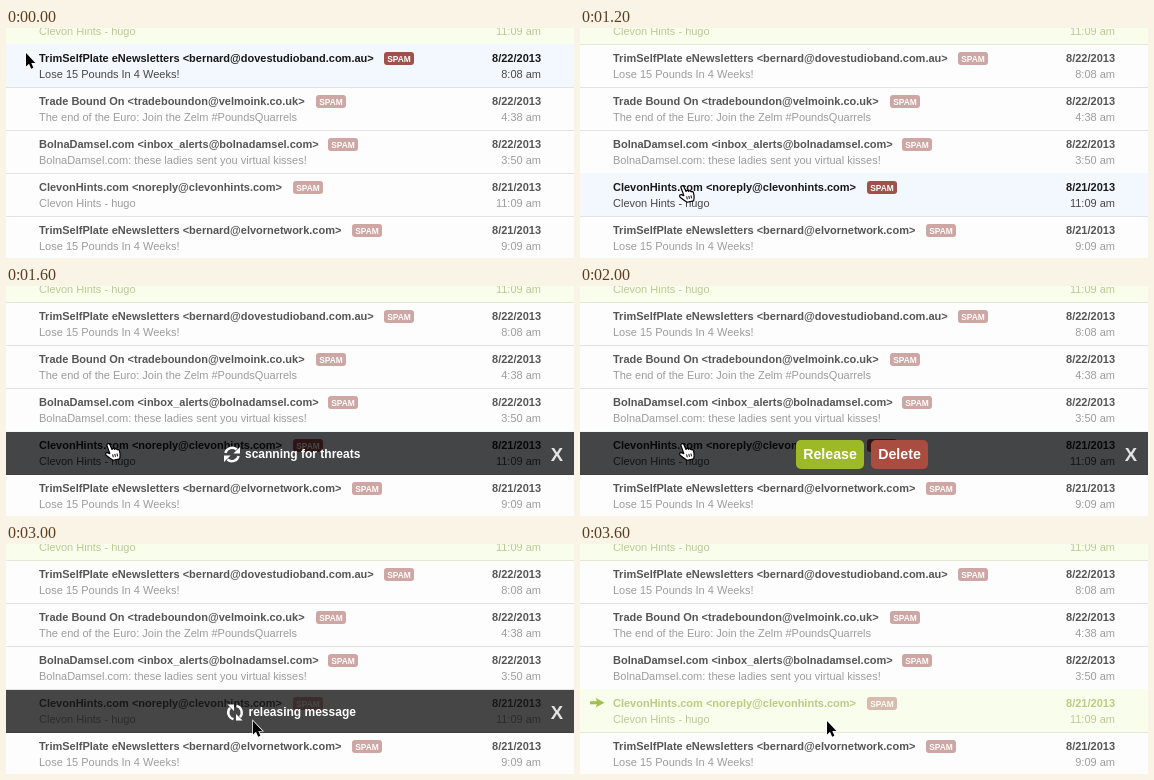
An HTML page for the animation above (8.6 s loop, 568 by 230 pixels).

```html
<!DOCTYPE html>
<html lang="en">
<head>
<meta charset="utf-8">
<title>Quarantined mail</title>
<style>
  html, body { margin: 0; width: 100%; height: 100%; overflow: hidden; background: #fdfdfd; }
  svg { display: block; font: 11px "Liberation Sans", Arial, sans-serif; }
  .bold { font-weight: bold; }
</style>
</head>
<body>
<svg id="stage" width="568" height="230" viewBox="0 0 568 230"></svg>
<script>
const LOOP = 8600, STEP = 200;
const GREEN = { bg: "#f9fdec", title: "#bccb83", sub: "#bdc894", line: "#e4e9d6" };
const stage = document.getElementById("stage");

function el(tag, attrs, parent = stage, text) {
  const node = document.createElementNS("http://www.w3.org/2000/svg", tag);
  set(node, attrs);
  if (text) node.textContent = text;
  return parent.appendChild(node);
}
function set(node, attrs) {
  for (const key in attrs) node.setAttribute(key, attrs[key]);
}
function label(text, x, y, attrs, parent) {
  return el("text", { x, y, ...attrs }, parent, text);
}
const show = (node, on) => set(node, { visibility: on ? "visible" : "hidden" });
const ramp = (t, start, length) => Math.min(1, Math.max(0, (t - start) / length));
const grey = (dim, lit, k) => {
  const v = Math.round(dim + (lit - dim) * k);
  return `rgb(${v},${v},${v})`;
};

// Message list
const RIGHT = { "text-anchor": "end" };
const messages = [
  ["TrimSelfPlate eNewsletters <bernard@dovestudioband.com.au>", "Lose 15 Pounds In 4 Weeks!", 378, "8/22/2013", "8:08 am"],
  ["Trade Bound On <tradeboundon@velmoink.co.uk>", "The end of the Euro: Join the Zelm #PoundsQuarrels", 310, "8/22/2013", "4:38 am"],
  ["BolnaDamsel.com <inbox_alerts@bolnadamsel.com>", "BolnaDamsel.com: these ladies sent you virtual kisses!", 322, "8/22/2013", "3:50 am"],
  ["ClevonHints.com <noreply@clevonhints.com>", "Clevon Hints - hugo", 287, "8/21/2013", "11:09 am"],
  ["TrimSelfPlate eNewsletters <bernard@elvornetwork.com>", "Lose 15 Pounds In 4 Weeks!", 346, "8/21/2013", "9:09 am"]
];

el("rect", { width: 568, height: 16, fill: GREEN.bg });
el("rect", { y: 16, width: 568, height: 1, fill: GREEN.line });
label("Clevon Hints - hugo", 33, 7, { fill: GREEN.sub });
label("11:09 am", 535, 7, { fill: GREEN.sub, ...RIGHT });

const rows = messages.map(([from, subject, badgeX, date, time], i) => {
  const g = el("g", { transform: `translate(0 ${17 + 43 * i})` });
  // The lit background also covers the divider above it
  const bg = el("rect", { y: -1, width: 568, height: 43 }, g);
  const line = el("rect", { y: 42, width: 568, height: 1 }, g);
  const title = el("g", { class: "bold" }, g);
  label(from, 33, 17, {}, title);
  label(date, 535, 17, RIGHT, title);
  const sub = el("g", {}, g);
  label(subject, 33, 33, {}, sub);
  label(time, 535, 33, RIGHT, sub);
  const badge = el("g", {}, g);
  el("rect", { x: badgeX, y: 7, width: 30, height: 13, rx: 3, fill: "#a0514b" }, badge);
  label("SPAM", badgeX + 15, 16.7, { fill: "#fff", class: "bold", "font-size": 8.4, "text-anchor": "middle" }, badge);
  return { bg, line, title, sub, badge };
});
const releasedArrow = el("path", {
  d: "M10 157.2H17L15.5 153.8L24.5 158.7L15.5 163.6L17 160.2H10Z", fill: "#a3bf4e"
});

// Overlay on the chosen message
const shade = el("rect", { y: 146, width: 568, height: 43, fill: "#000" });
const close = label("X", 551, 175, {
  class: "bold", "font-size": 18.5, "text-anchor": "middle", fill: "#e4e4e4"
});

function busy(text, iconX, textX) {
  const g = el("g", { fill: "#fff" });
  const icon = el("g", {}, g);
  for (const turn of [0, 180]) {
    const half = el("g", { transform: `rotate(${turn})` }, icon);
    el("path", { d: "M-6.6 -1.5A6.8 6.8 0 0 1 4.6 -5", fill: "none", stroke: "#fff", "stroke-width": 2.4 }, half);
    el("path", { d: "M8 -7.6V-1H1.4Z" }, half);
  }
  label(text, textX, 172, { class: "bold", "font-size": 12 }, g);
  return { g, spin: angle => set(icon, { transform: `translate(${iconX} 168.5) rotate(${angle})` }) };
}
const scanning = busy("scanning for threats", 226, 239);
const releasing = busy("releasing message", 229, 242.5);

const buttons = el("g", { class: "bold", "font-size": 14.2, "text-anchor": "middle" });
function button(text, x, width, fill) {
  const box = el("rect", { x, y: 154, width, height: 29, rx: 5, fill }, buttons);
  label(text, x + width / 2, 173, { fill: "#fff" }, buttons);
  return box;
}
const releaseButton = button("Release", 216, 68, "#9db928");
button("Delete", 291, 57, "#a94d40");

// Pointer: [time, x, y] of its tip
const pointerPath = [
  [0, 20, 25], [200, 17, 27], [600, 21, 31], [800, 75, 115], [1000, 100, 155],
  [1200, 102.5, 157.5], [2200, 120, 163], [2400, 231, 167], [2600, 246.5, 179], [2800, 247, 177]
];
const arrow = el("path", {
  d: "M0 0V13.5L3 10.8L5.2 15.8L7.4 14.8L5.3 9.9H9.4Z",
  fill: "#000", stroke: "#fff", "stroke-width": 1.4, "paint-order": "stroke"
});
const hand = el("g", { stroke: "#000", "stroke-linejoin": "round" });
const handShape = el("g", { transform: "rotate(-12)" }, hand);
el("path", {
  d: "M-2 1Q-.5 -.7 1 1L2.2 6.5Q4 5 4.8 7Q6.6 6 7.2 8Q9 7.5 9.2 9.5V12Q9 15 7.7 17.3H1Q-2 14.5 -4.8 11Q-5.6 8 -3 8.7L-.8 10.2Z",
  fill: "#fff", "stroke-width": 1.2
}, handShape);
el("path", { d: "M1.8 11.5V14.5M4 11.5V14.5M6.2 11.5V14.5", "stroke-width": .9 }, handShape);

function drawRows(t) {
  const hover = [
    1 - ramp(t, 700, 300), 0,
    ramp(t, 650, 300) - ramp(t, 850, 300),
    ramp(t, 850, 300) - ramp(t, 2250, 300), 0
  ];
  const released = t >= 3200;
  rows.forEach((row, i) => {
    const k = hover[i], green = released && i === 3;
    set(row.bg, { fill: green ? GREEN.bg : "#f3f8fe", opacity: green ? 1 : k });
    set(row.line, { fill: green ? GREEN.line : "#e3e3e3" });
    set(row.title, { fill: green ? GREEN.title : grey(85, 24, k) });
    set(row.sub, { fill: green ? (t < 3400 ? "#828d58" : GREEN.sub) : grey(156, 70, k) });
    set(row.badge, { opacity: green ? .38 : .5 + .5 * k });
  });
  show(releasedArrow, released);
}

function drawOverlay(t) {
  set(shade, { opacity: .72 * (ramp(t, 1300, 211) - ramp(t, 3075, 200)) });
  show(close, t >= 1400 && t < 3400);
  show(scanning.g, t >= 1400 && t < 1800);
  show(releasing.g, t >= 2800 && t < 3400);
  scanning.spin(t * .45);
  releasing.spin(t * .45);
  show(buttons, t >= 1800 && t < 2800);
  set(buttons, { opacity: ramp(t, 1680, 200) });
  set(releaseButton, { fill: t >= 2400 ? "#a9ce1e" : "#9db928" });
}

function drawPointer(t) {
  const [, x, y] = pointerPath.filter(key => key[0] <= t).pop();
  const pointing = t >= 800 && t < 2800;
  show(hand, pointing);
  show(arrow, !pointing);
  set(pointing ? hand : arrow, { transform: `translate(${x} ${y})` });
}

function draw(time) {
  const t = Math.floor(time % LOOP / STEP) * STEP;
  drawRows(t);
  drawOverlay(t);
  drawPointer(t);
}

const start = performance.now();
function tick() {
  draw(performance.now() - start);
  requestAnimationFrame(tick);
}
tick();
</script>
</body>
</html>
```
